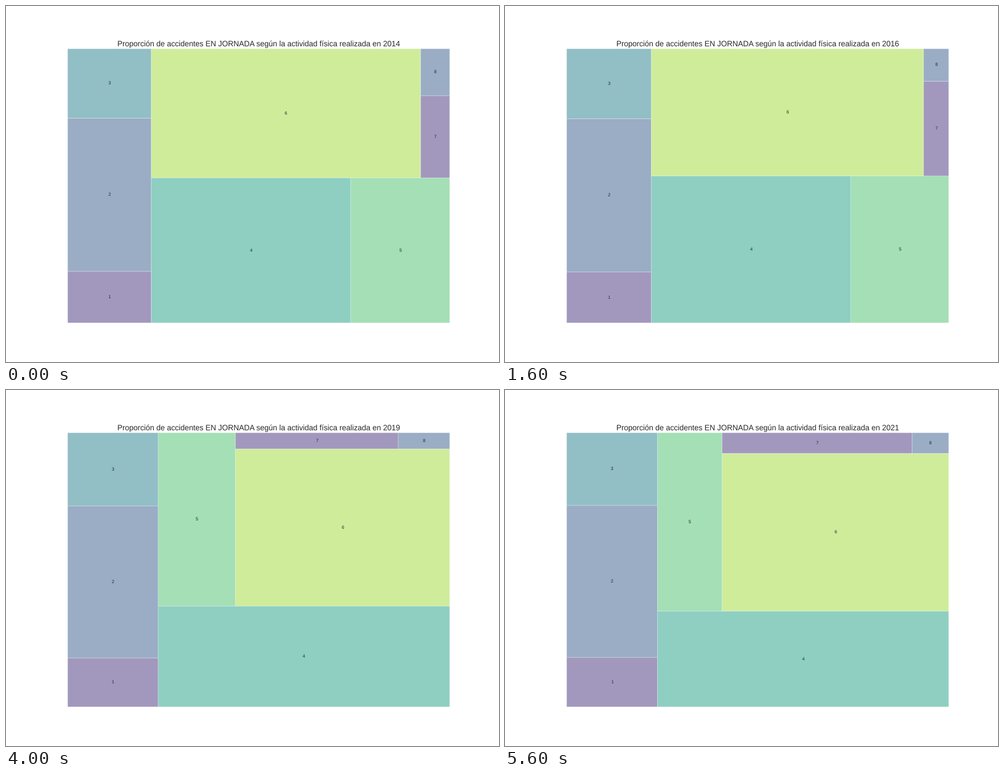
Recreate the animation shown at these times as a matplotlib script. Size 881 by 636 pixels, loop 6400 ms.

```python
import matplotlib.pyplot as plt
from matplotlib.animation import FuncAnimation
from matplotlib.patches import Rectangle

W, H, DPI = 881, 636, 64
LEFT, RIGHT = W * 0.125, W * 0.9
TOP, BOTTOM = H * 0.12, H * 0.89
INK = "0.15"

plt.rcParams["font.family"] = "Liberation Sans"
plt.rcParams["text.hinting"] = "none"

# Per year: left column edge, its two cuts, lower row edge, then three inner cuts
CUTS = {
    2014: (259.7, 474.0, 200.3, 307.0, 616.0, 741.0, 160.0),
    2015: (261.3, 474.5, 201.0, 305.3, 618.0, 744.5, 147.0),
    2016: (261.3, 475.0, 201.5, 303.7, 618.0, 748.0, 134.3),
    2017: (266.0, 476.3, 202.3, 387.8, 409.0, 104.0, 698.8),
    2018: (269.0, 477.5, 204.7, 387.0, 409.5, 104.6, 700.0),
    2019: (272.0, 478.8, 207.0, 386.0, 410.0, 105.2, 701.0),
    2020: (273.3, 477.3, 201.0, 392.7, 395.3, 107.0, 715.0),
    2021: (272.3, 477.8, 206.0, 395.0, 388.0, 113.2, 727.5),
}
YEARS = list(CUTS)


def pt(pixels):
    return pixels * 72 / DPI


def tiles(year):
    """Boxes (x0, y0, x1, y1) of the activities 1 to 8."""
    col, low, high, row, a, b, c = CUTS[year]
    boxes = [
        (LEFT, low, col, BOTTOM),
        (LEFT, high, col, low),
        (LEFT, TOP, col, high),
    ]
    if year < 2017:
        return boxes + [
            (col, row, a, BOTTOM),
            (a, row, RIGHT, BOTTOM),
            (col, TOP, b, row),
            (b, c, RIGHT, row),
            (b, TOP, RIGHT, c),
        ]
    return boxes + [
        (col, row, RIGHT, BOTTOM),
        (col, TOP, a, row),
        (a, b, RIGHT, row),
        (a, TOP, c, b),
        (c, TOP, RIGHT, b),
    ]


fig = plt.figure(figsize=(W / DPI, H / DPI), dpi=DPI, facecolor="white")
ax = fig.add_axes([0, 0, 1, 1])
ax.set(xlim=(0, W), ylim=(H, 0))
ax.axis("off")

viridis = plt.get_cmap("viridis")
rects, labels = [], []
for i in range(8):
    rect = Rectangle((0, 0), 1, 1, facecolor=viridis((i % 6 + 1) / 7),
                     edgecolor="white", linewidth=pt(0.68), alpha=0.5,
                     snap=False)
    rects.append(ax.add_patch(rect))
    labels.append(ax.text(0, 0, str(i + 1), ha="center", va="center",
                          fontsize=pt(8.16), color=INK, zorder=3))
title = ax.text((LEFT + RIGHT) / 2, TOP - 4.1, "", ha="center",
                va="baseline", fontsize=pt(13.62), color=INK)


def draw(frame):
    year = YEARS[frame]
    for rect, label, (x0, y0, x1, y1) in zip(rects, labels, tiles(year)):
        rect.set_bounds(x0, y0, x1 - x0, y1 - y0)
        label.set_position(((x0 + x1) / 2, (y0 + y1) / 2))
    title.set_text("Proporción de accidentes EN JORNADA según la actividad "
                   f"física realizada en {year}")
    return [*rects, *labels, title]


anim = FuncAnimation(fig, draw, frames=len(YEARS), interval=800,
                     repeat=True, repeat_delay=0)
plt.show()
```
